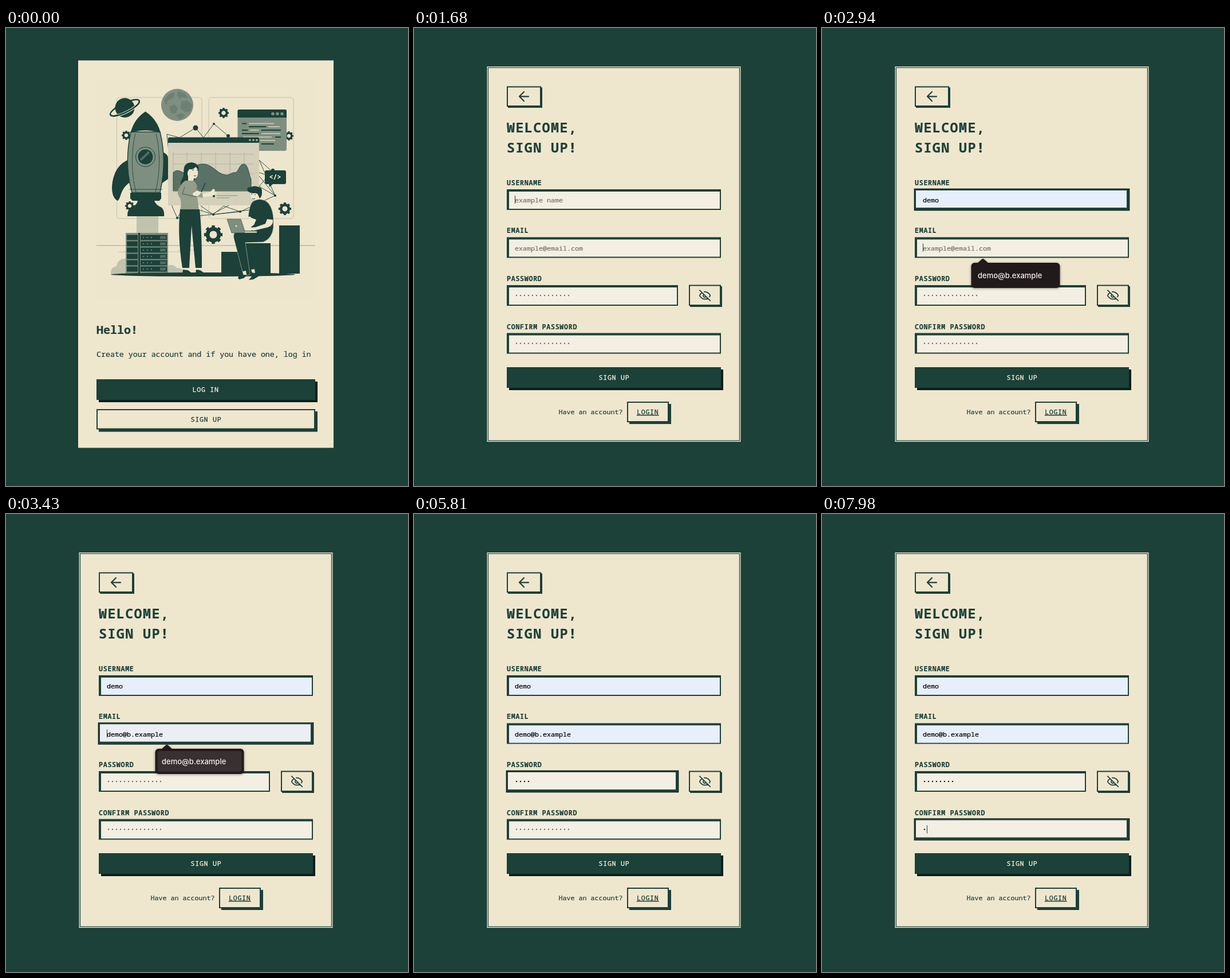
These frames come from a looping animation (702 px wide and 798 px high, 8000 ms). An HTML page:

```html
<!DOCTYPE html>
<html lang="en">
<meta charset="utf-8">
<title>Sign up</title>
<style>
html, body { margin: 0; height: 100%; overflow: hidden; background: #1b4139 }
svg { display: block; --dark: #1b4139; --card: #efe6ce; --mid: #7e8f80; --light: #c1c3ad }
text { font: 11.667px "Noto Sans Mono", monospace; fill: var(--dark); stroke: var(--dark); stroke-width: .2; white-space: pre }
.label { font-weight: 700; letter-spacing: .7px }
.btn { font-weight: 500; letter-spacing: .7px; stroke-width: .3 }
.title { font-size: 23.333px; font-weight: 700; letter-spacing: 1.4px }
.pop { font: 500 13px Inter, sans-serif; fill: #f6f1ee; stroke: none }
.on { fill: #f7efd9; stroke: #f7efd9 }
.d { fill: var(--dark) } .c { fill: var(--card) } .m { fill: var(--mid) } .l { fill: var(--light) }
.line { fill: none; stroke: var(--dark) }
.box { fill: var(--card); stroke: var(--dark); stroke-width: 2 }
</style>
<svg width="702" height="798" viewBox="0 0 702 798">
<defs>
  <g id="gear" class="line">
    <circle r="6.2" stroke-width="4.2"/>
    <circle r="8.6" stroke-width="3" pathLength="16" stroke-dasharray="1" stroke-dashoffset=".5"/>
  </g>
</defs>

<g id="welcome">
  <path class="c" d="M126 56.5h446v675H126z"/>
  <path fill="#ede5cc" d="M158 88h382v388H158z"/>
  <g fill="none" stroke="#c3c5af">
    <rect x="193.5" y="121" width="148.5" height="211" rx="5"/>
    <rect x="354" y="121" width="148" height="211" rx="5"/>
    <path d="M196 390h120M300 387h40"/>
    <path stroke="#9da697" d="M158 379h382"/>
  </g>

  <!-- planet and moon -->
  <g transform="translate(207.5 139) rotate(-26)" class="line" stroke-width="2.4">
    <ellipse rx="28" ry="8"/>
    <circle class="d" r="15.8"/>
    <path stroke="#efe6ce" stroke-width="4.6" d="M-17 6.4A28 8 0 0 0 17 6.4"/>
    <path d="M-28 0A28 8 0 0 0 28 0"/>
  </g>
  <circle class="m" cx="299" cy="134" r="28"/>
  <path fill="#6e8074" d="M276 126q8-14 19-13l-3 9-9 4-3 9zM301 110l12 4 5 9-9-3-6 4-5-7zM306 128l9-2 10 7-3 12-9 2-8-7zM285 137l9-4 6 7-3 9-9-1zM296 152l10-4 7 4-9 8z"/>

  <g id="gears"></g>

  <!-- network -->
  <path class="line" stroke-width=".9" d="M281 185l4 40M281 185l22 6 28-17 14 17 18-24 25 21M442 230l39 34-39-12M442 230l28 62-28-34M470 292l-28-16 24-28M299 331l14-22 49 16 47-5 61-28M299 331l60-6 30-16M340 310l22 15 18-15 29 10M362 325l80-10M299 331l-10-23"/>
  <g class="d"><circle cx="331" cy="174" r="4.5"/><circle cx="363" cy="167" r="2"/><circle cx="388" cy="188" r="3"/><circle cx="470" cy="292" r="2"/><circle cx="409" cy="320" r="2"/><circle cx="362" cy="325" r="2"/><circle cx="299" cy="331" r="2"/><circle cx="466" cy="248" r="3"/></g>

  <!-- code window -->
  <rect class="m" x="404.5" y="142" width="85.5" height="72" rx="3"/>
  <path class="d" d="M404.5 156v-11q0-3 3-3h79.5q3 0 3 3v11z"/>
  <path stroke="#7e8f80" stroke-width="5.6" stroke-linecap="round" stroke-dasharray="0 8" d="M466 149.500h17"/>
  <g fill="none" stroke-width="2.2">
    <path stroke="#1b4139" d="M412 166.500h8M424 172h30M412 178h10M446 178h34M412 184h30M470 190h10M424 196h16M412 202h9M446 202h22"/>
    <path stroke="#c1c3ad" d="M424 166.500h44M458 172h20M426 178h16M446 184h33M414 190h50M444 196h26M426 202h14"/>
  </g>

  <!-- dashboard -->
  <path fill="#d4d0ba" d="M283 191h159v118H283z"/>
  <path class="d" d="M283 200v-7.500q0-2 2-2h155q2 0 2 2v7.500z"/>
  <path stroke="#aeb4a3" stroke-width="3.6" stroke-linecap="round" stroke-dasharray="0 6" d="M426 195.300h13"/>
  <path stroke="#a9ae9c" stroke-width=".8" fill="none" d="M292 220h141M292 237h141M292 254h141M292 270h141M292 217v67M316 217v67M341 217v67M366 217v67M391 217v67M416 217v67"/>
  <path fill="#5a7166" stroke="#1b4139" stroke-width=".8" d="M292 284v-32c10-10 16 4 25 0s13-16 28-15 22 14 34 18 13-4 20-3 8-15 16-15 9 18 13 26v21z"/>
  <path stroke="#83917f" fill="none" d="M292 284h141M368 292h36M368 296h22"/>

  <!-- rocket -->
  <path class="l" d="M228 326h38v34h-38z"/>
  <path class="d" d="M213 230c-20 8-28 30-28 50q1 17 10 21c7-5 3-19 21-32zM273 216q9 3 10 10v37l-10 7z"/>
  <path class="m" stroke="#1b4139" stroke-width="1.4" d="M218 181h51c9 36 8 70 0 106h-49c-10-36-10-70-2-106z"/>
  <path class="line" stroke-width=".8" d="M226 184c-8 34-7 70 1 102M262 184c8 34 7 70-1 102M215 281h58"/>
  <path class="d" d="M243.500 145.500q20 13 26.500 37-27-8-52.500 0 6-24 26-37zM217 287h54v10l-3 4h-9q2 7 13 12 5 5 4 15h-64q0-10 4-14 13-5 14-13h-9l-4-4z"/>
  <circle class="m" stroke="#1b4139" cx="243.5" cy="224.5" r="17"/>
  <circle class="d" cx="243.5" cy="224.5" r="13"/>
  <path stroke="#526c61" stroke-width="4" d="M235 230l15-14"/>

  <!-- server -->
  <path class="l" d="M183 428q-1-11 10-13 2-13 16-13 11 0 18 10l38 2q10-6 18 0 10-3 15 4 12-1 12 10z"/>
  <path class="m" d="M209 357h74v71h-74z"/>
  <path class="d" d="M231 357h3v71h-3z"/>
  <g stroke="#1b4139" stroke-width="8.8" id="racks"></g>
  <ellipse class="d" cx="344" cy="429.5" rx="161" ry="3.5"/>
  <path class="d" d="M376 390h35v-15h51v54h-86zM477 344h36v84h-36z"/>

  <!-- bubble -->
  <path class="d" d="M455 248h31q3 0 3 3v18q0 3-3 3h-20l-6 5-1-5h-4q-3 0-3-3v-18q0-3 3-3z"/>
  <text x="459.5" y="264" class="on" style="font-weight:700">&lt;/&gt;</text>

  <!-- presenter -->
  <path class="d" d="M337 245c-1-10-14-14-22-8-7 5-3 16-6 23-4 6-6 13-1 18 5 3 14-2 18-6z"/>
  <path class="c" d="M320 246q8 1 11-4 5 3 4 12-1 9-7 8l-1 6h-9v-10q-3-6 2-12z"/>
  <path fill="none" stroke="#1b4139" d="M325 248l3-1M333 247l2 1M328 257q2 2 4 0"/>
  <path fill="#949c8a" d="M313 266h14q7 4 9 20l9 3-2 7-9-2 3 23h-33q4-16-2-24-5-8 2-17 4-7 9-10z"/>
  <path class="line" stroke-width=".7" d="M312 277l-4 12 24 5M333 277l2 11"/>
  <path class="c" d="M326 288l8-5 7 4-6 6-8-1zM343 289l13-3 6-6 3 2-1 4 5 1-7 5-18 3z"/>
  <path class="line" stroke-width="1.6" d="M341 286l7-16"/>
  <circle class="d" cx="363" cy="293" r="2"/>
  <path class="d" d="M304 316h34q4 30 4 102h-11l-7-74-4 74h-12q-9-56-4-102z"/>
  <path class="c" d="M310 418h8v5h-8zM333 418h7v5h-7z"/>
  <path class="d" d="M309 421l9 1 5 4v2h-15zM332 421l7 1 6 4v2h-14z"/>

  <!-- coder -->
  <path class="c" d="M427 282h16l3 10-5 6v6h-9l1-4q-7-1-6-18z"/>
  <path class="d" d="M422 284q-3-7 6-7 6-3 13 0 7 1 6 9 0 8-4 11l-3-7q-2-3-8-2-6 0-10-4z"/>
  <path fill="none" stroke="#1b4139" d="M428 290l2-1M434 290l2 1M430 297q3 2 5 0"/>
  <path class="d" stroke="#ede5cc" stroke-width=".5" d="M433 301q10-5 20 0 12 7 14 30v16q-2 20-18 26l-31 1 8 55-11 3-17-65q-3-12 9-14h21l-1-24h-4q2-24 10-28z"/>
  <path class="c" d="M413 424l6-1 1 7h-5zM428 421l6-1 1 7h-5z"/>
  <path class="d" d="M408 430l13 1-6 5-8 2-2-3zM426 426l11 1 5 5-10 6-8 1 5-6z"/>
  <path class="c" d="M424 329l3 8-11 11 5 4 12-9 4-9zM456 333l10 1q1 10-8 13l-25 6-11-1 3-4 11-1 17-6z"/>
  <path class="m" stroke="#1b4139" stroke-width=".6" d="M386 333h24l8 24h-24z"/>
  <path class="l" d="M417 354h21v3h-21z"/><circle class="c" cx="402" cy="345" r="1.5"/>

  <text x="158" y="533" style="font-size:20px;font-weight:700">Hello!</text>
  <text x="158" y="573" style="font-size:13.29px">Create your account and if you have one, log in</text>
  <path fill="#07211c" d="M162 616h382v36H162z"/>
  <path class="d" d="M158 612h382v36H158z"/>
  <text class="btn on" x="325.5" y="634">LOG IN</text>
  <g id="signup"></g>
</g>

<g id="form">
  <path fill="#efe6ce" d="M127.500 67h443v654h-443z"/>
  <rect class="box" style="stroke-width:1.2" x="129.5" y="69" width="439" height="650"/>
  <path class="d" d="M164 103.500h60V139h-60zM482 450h56v36h-56zM376 655h73v35h-73z"/>
  <path class="box" d="M163 102.500h58V136h-58zM481 448.500h54V483h-54zM373 652h71v34h-71z"/>
  <g class="line" stroke-width="1.9" stroke-linecap="round" stroke-linejoin="round">
    <path transform="translate(178.2 105.5) scale(1.15)" d="M19 12H5m7-7-7 7 7 7"/>
    <path transform="translate(497 455) scale(.92)" d="M9.9 9.9a3 3 0 1 0 4.200 4.200M10.700 5.100A10.400 10.400 0 0 1 12 5c7 0 10 7 10 7a13 13 0 0 1-1.700 2.700M6.600 6.600A13.500 13.500 0 0 0 2 12s3 7 10 7a9.700 9.700 0 0 0 5.400-1.600M2 2l20 20"/>
  </g>
  <text class="title" x="162" y="181.5">WELCOME,</text>
  <text class="title" x="162" y="217">SIGN UP!</text>
  <text class="label" x="162" y="273.5">USERNAME</text>
  <text class="label" x="162" y="357">EMAIL</text>
  <text class="label" x="162" y="441">PASSWORD</text>
  <text class="label" x="162" y="524.5">CONFIRM PASSWORD</text>
  <path fill="#07211c" d="M166 595h374v36H166z"/>
  <path class="d" d="M162 591h374v36H162z"/>
  <text class="btn on" x="322.5" y="613">SIGN UP</text>
  <text x="252.5" y="673">Have an account?</text>
  <text class="btn" x="389" y="673" text-decoration="underline">LOGIN</text>
  <g id="fields"></g>
</g>
<g id="pointer"></g>
</svg>
<script>
const $ = id => document.getElementById(id);
const clamp = x => Math.max(0, Math.min(1, x));
const easeOut = x => 1 - (1 - clamp(x)) ** 2;
const NAME = 'demo', MAIL = 'demo@b.example';
const STEP = 70, LOOP = 8000;
const KEYS = [4830, 4970, 5180, 5320, 5880, 6160, 6300, 6440], CONFIRM_KEYS = [7980];
const CARET_OFF = [[4620, 4830], [5810, 5880], [7000, 7210], [7770, 7980]];

$('gears').innerHTML = [[380, 148, .9], [210, 187, .8], [494, 188, .8], [216, 310, .8], [487, 315, 1.1], [362, 360, 1.6]]
  .map(([x, y, s]) => `<use href="#gear" transform="translate(${x} ${y}) scale(${s})"/>`).join('');
$('racks').innerHTML = Array.from({ length: 6 }, (_, i) => {
  const y = 365 + 11 * i;
  return `<path d="M211 ${y}h19M235 ${y}h46"/>
    <path stroke="#9da697" stroke-width="1.6" stroke-dasharray="1.6 5.4" d="M239 ${y}h17"/>
    <path stroke="#526c61" stroke-width="5" d="M269 ${y}h10"/>`;
}).join('');

function signUpButton(hover) {
  const s = 4 * (1 - hover);
  return `<rect class="d" x="${158 + s}" y="${664 + s}" width="382" height="35.5"/>
    <rect class="box" x="159" y="665" width="380" height="33.5"/>
    <rect x="160" y="666" width="378" height="31.5" fill="#f0e0bc" opacity="${hover}"/>
    <text class="btn" x="322.5" y="686">SIGN UP</text>`;
}

const dots = (y, n, color) =>
  `<path d="M179 ${y + 18}h${7 * (n - 1) + .1}" stroke="${color}" stroke-width="2.4" stroke-linecap="round" stroke-dasharray="0 7"/>`;

const words = (y, str, color) => `<text x="176" y="${y + 23}" style="fill:${color};stroke:${color}">${str}</text>`;

// The inset edge slides from the top left to the bottom right on focus.
function field(y, width, focus, blue, content) {
  const o = 4 - 2 * focus;
  return `<rect x="161.5" y="${y - .5}" width="${width + 1}" height="37" fill="none" stroke="#07211c" stroke-width="1.6" opacity="${focus}"/>
    <rect class="d" x="162" y="${y}" width="${width}" height="36"/>
    <rect x="${162 + o}" y="${y + o}" width="${width - 6}" height="30" fill="#f3efe2"/>
    <rect x="${162 + o}" y="${y + o}" width="${width - 6}" height="30" fill="#e7effd" opacity="${blue}"/>` + content;
}

function popup(y, items, hover) {
  const h = 8 + 36 * items.length;
  return `<g style="filter:drop-shadow(0 1px 2px #0006)" fill="#211a1b">
    <rect x="260.5" y="${y}" width="155" height="${h}" rx="6"/>
    <path d="M271 ${y + 1}l8-7q2-2 4 0l8 7z"/></g>
    <rect x="264.5" y="${y + 4}" width="147" height="36" rx="4" fill="#443b3d" opacity="${hover}"/>` +
    items.map((s, i) => `<text class="pop" x="272" y="${y + 27 + 36 * i}">${s}</text>`).join('');
}

function drawFields(t) {
  const focus = (from, to) => easeOut((t - from) / 140) * (1 - easeOut((t - to) / 140));
  const preview = from => clamp((t - from + STEP) / 210);
  const typed = keys => keys.filter(k => t >= k).length;
  const hint = '#6f7266', ink = '#10251f';
  const secret = (y, n) => n ? dots(y, n, ink) : dots(y, 14, hint);
  const pass = typed(KEYS), confirm = typed(CONFIRM_KEYS);

  let out = field(281, 374, focus(1680, 2940), preview(2240),
      t < 2240 ? words(281, 'example name', hint) : words(281, NAME, '#000')) +
    field(364.5, 374, focus(2940, 4130), preview(3360),
      t < 3360 ? words(364.5, 'example@email.com', hint) : words(364.5, MAIL, '#000')) +
    field(448, 299, focus(4130, 7210), 0, secret(448, pass)) +
    field(531.5, 374, focus(7210, LOOP * 2), 0, secret(531.5, confirm));

  if (t >= 1680 && !CARET_OFF.some(([a, b]) => t >= a && t < b)) {
    const [y, n] = t < 2940 ? [281, t < 2520 ? 0 : NAME.length]
      : t < 4130 ? [364.5, t < 3710 ? 0 : MAIL.length]
      : t < 7210 ? [448, pass] : [531.5, confirm];
    out += `<path class="line" d="M${176.5 + 7 * n} ${y + 11}v14"/>`;
  }
  if (t >= 1750 && t < 2520) out += popup(325.5, [NAME, NAME + '2'], t < 2240 ? 0 : preview(2240));
  if (t >= 2940 && t < 3710) out += popup(409, [MAIL], t < 3360 ? 0 : preview(3360));
  return out;
}

function drawPointer(t) {
  if (t >= 560 && t < 1190) {
    const k = easeOut((t - 560) / 140);
    return `<path transform="translate(${400 - 63 * k} ${411 + 270 * k})" stroke="#fff" d="M0 0v13.500l3.200-3 2.300 5.500 2.500-1-2.300-5.400h4.300z"/>`;
  }
  if (t >= 6650 && t < 6720)
    return '<path class="line" d="M254.500 452.500q3 0 3 3v11q0 3-3 3m6-17q-3 0-3 3m0 11q0 3 3 3"/>';
  return '';
}

let last = -1;
function frame() {
  const t = Math.floor(performance.now() % LOOP / STEP) * STEP;
  if (t !== last) {
    const signingUp = t >= 910;
    $('welcome').style.display = signingUp ? 'none' : '';
    $('form').style.display = signingUp ? '' : 'none';
    if (signingUp) $('fields').innerHTML = drawFields(t);
    else $('signup').innerHTML = signUpButton(clamp((t - 560) / 140));
    $('pointer').innerHTML = drawPointer(t);
    last = t;
  }
  requestAnimationFrame(frame);
}
frame();
</script>
</html>
```
